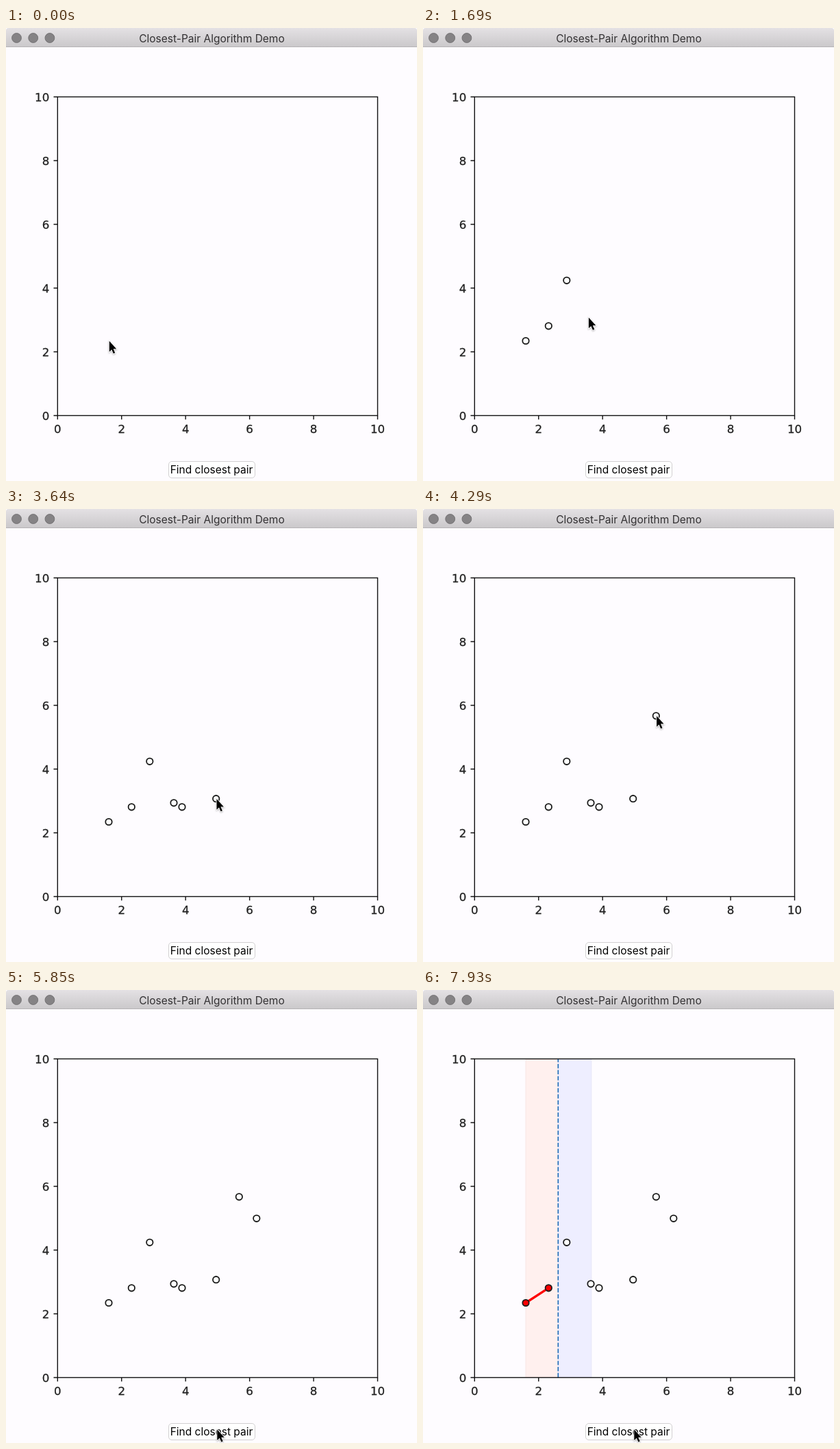
These frames come from a looping animation (600x661 px, 8000 ms). An HTML page:

```html
<!DOCTYPE html>
<html lang="en">
<head>
<meta charset="utf-8">
<title>Closest-Pair Algorithm Demo</title>
<style>
  html, body { margin: 0; height: 100%; overflow: hidden; background: #fefcff; }
  svg { display: block; }
  .ui { font: 15.5px Inter, "Open Sans", sans-serif; text-anchor: middle; }
  .tick { font: 16.67px "DejaVu Sans", sans-serif; fill: #222; stroke: #222; stroke-width: .3; }
  #cursor { filter: drop-shadow(0 1.5px 1px rgba(0, 0, 0, .3)); }
</style>
</head>
<body>
<svg width="600" height="661" viewBox="0 0 600 661">
  <defs>
    <linearGradient id="bar" x2="0" y2="1">
      <stop stop-color="#e4e1e4"/><stop offset="1" stop-color="#cac8ca"/>
    </linearGradient>
    <linearGradient id="press" x2="0" y2="1">
      <stop stop-color="#64b0fa"/><stop offset="1" stop-color="#1070f0"/>
    </linearGradient>
  </defs>

  <path d="M0 28V4Q0 0 4 0H596Q600 0 600 4V28Z" fill="url(#bar)"/>
  <path d="M0 27.5H600" stroke="#b5b3b5"/>
  <g id="lights" fill="#858385" stroke="#747274"></g>
  <text class="ui" x="300.5" y="20.5" fill="#333133">Closest-Pair Algorithm Demo</text>

  <g id="split">
    <rect x="150" y="101" width="47.3" height="464" fill="#fff0ee" stroke="#f8e6e4"/>
    <rect x="197.3" y="101" width="48.5" height="464" fill="#eeeeff" stroke="#e5e5f8"/>
    <path d="M197.3 565V101" stroke="#2670b8" stroke-width="1.7" stroke-dasharray="6.17 2.67"/>
  </g>
  <g id="axes" stroke="#111" stroke-width="1.4" fill="none">
    <rect x="75.3" y="100.5" width="467.2" height="465"/>
  </g>
  <g id="lines" stroke-width="3.3" stroke-linecap="round"></g>
  <g id="dots" stroke="#1a1a1a" stroke-width="1.8"></g>

  <rect id="button" x="237.5" y="632.5" width="126" height="24" rx="4.5" stroke="#d2d0d2"/>
  <text id="label" class="ui" x="300" y="650">Find closest pair</text>
  <path id="cursor" d="M.8 .3V16L4.3 12.8L6.8 18.6L9.2 17.6L6.7 11.8H11.2Z"
        stroke="#fff" stroke-width="1.6" paint-order="stroke"/>
</svg>
<script>
const $ = id => document.getElementById(id);
const LOOP = 8000, STEP = 130, TRAVEL = 4 * STEP;
const SPLIT = 6110, MERGE = 7280;

// x, y and time of each click; the last one presses the button
const clicks = [
  [150, 456.5, 260], [183.3, 434.8, 1040], [209.8, 368.3, 1430],
  [245, 428.8, 1950], [257, 434.8, 2600], [306.7, 422.7, 3510],
  [340.3, 301.8, 4290], [365.8, 333.3, 4810], [307.5, 641, 5980]
];
const points = clicks.slice(0, -1);
const press = clicks.at(-1)[2];

function add(parent, tag, attrs, text = '') {
  const el = document.createElementNS('http://www.w3.org/2000/svg', tag);
  for (const k in attrs) el.setAttribute(k, attrs[k]);
  el.textContent = text;
  return $(parent).appendChild(el);
}

for (let i = 0; i < 3; i++) add('lights', 'circle', { cx: 15.5 + 24.2 * i, cy: 14.5, r: 6.9 });

for (let n = 0; n <= 10; n += 2) {
  const x = 75.3 + 46.72 * n, y = 565.5 - 46.5 * n;
  add('axes', 'path', { d: `M${x} 565.5v5.8M75.3 ${y}h-5.8` });
  add('axes', 'text', { class: 'tick', x, y: 590.6, 'text-anchor': 'middle' }, n);
  add('axes', 'text', { class: 'tick', x: 63.3, y: y + 6, 'text-anchor': 'end' }, n);
}

const dots = points.map(([cx, cy]) => add('dots', 'circle', { cx, cy, r: 4.7 }));
const join = ([x1, y1], [x2, y2], stroke) => add('lines', 'line', { x1, y1, x2, y2, stroke });
const redLine = join(points[0], points[1], '#f00');
const blueLine = join(points[2], points[3], '#00f');

const show = (el, on) => el.setAttribute('visibility', on ? 'visible' : 'hidden');

// The cursor slows into each click position and arrives one step before the click.
function cursorAt(t) {
  const next = clicks.findIndex(c => t < c[2]);
  if (next < 0) return clicks.at(-1).slice(0, 2);
  const [x, y, click] = clicks[next];
  const [x0, y0, last] = clicks[next - 1] || clicks[0];
  const end = click - STEP, start = Math.max(last, end - TRAVEL);
  const p = next ? Math.min(1, Math.max(0, (t - start) / (end - start))) : 1;
  const left = (1 - p) ** 2;
  return [x + (x0 - x) * left, y + (y0 - y) * left];
}

function draw(now) {
  const t = Math.floor(now % LOOP / STEP) * STEP;
  const red = t >= SPLIT, blue = red && t < MERGE;
  const pressed = t >= press && t < SPLIT;

  dots.forEach((dot, i) => {
    show(dot, t >= points[i][2]);
    dot.setAttribute('fill', red && i < 2 ? '#f00' : blue && (i === 2 || i === 3) ? '#22f' : '#fff');
  });
  show($('split'), red);
  show(redLine, red);
  show(blueLine, blue);
  $('button').setAttribute('fill', pressed ? 'url(#press)' : '#fff');
  $('label').setAttribute('fill', pressed ? '#fff' : '#000');
  $('cursor').setAttribute('transform', `translate(${cursorAt(t)})`);
  requestAnimationFrame(draw);
}
draw(0);
</script>
</body>
</html>
```
